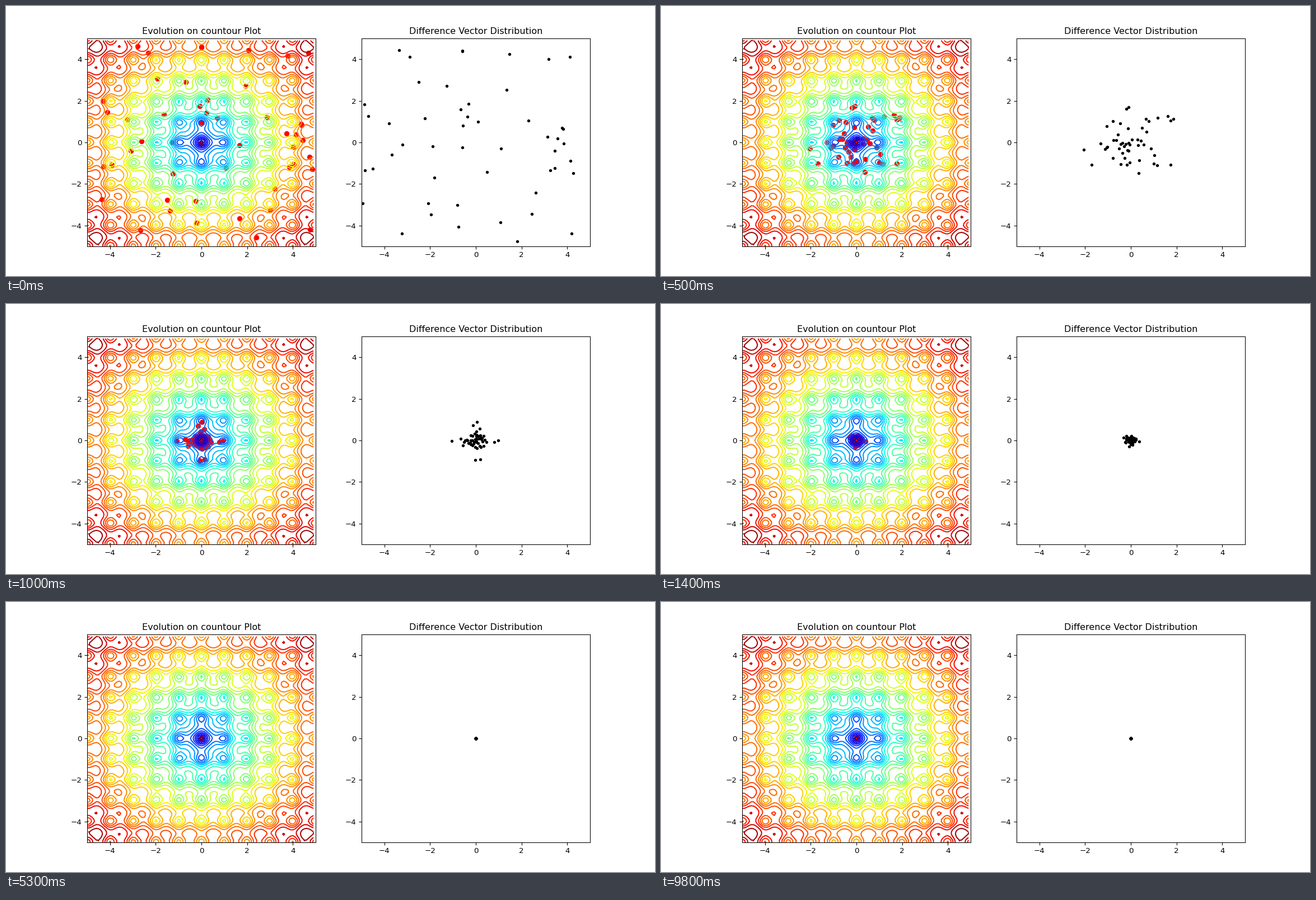
These frames come from a looping animation (1159 px wide and 483 px high, 10000 ms). A matplotlib script:

```python
import numpy as np
import matplotlib.pyplot as plt
from matplotlib.animation import FuncAnimation

FRAMES, INTERVAL = 100, 100
WIDTH, HEIGHT, DPI = 1159, 483, 96
MEMBERS = 50
REACH, DECAY = 4.5, 0.23    # width of the search and its decay per generation


def ackley(x, y):
    bowl = -20 * np.exp(-0.2 * np.sqrt(0.5 * (x**2 + y**2)))
    ripple = -np.exp(0.5 * (np.cos(2 * np.pi * x) + np.cos(2 * np.pi * y)))
    return bowl + ripple + np.e + 20


def evolve(seed=4):
    """Each generation, a member moves to its trial point if that is better."""
    rng = np.random.default_rng(seed)
    points = rng.uniform(-5, 5, (MEMBERS, 2))
    history = [points]
    for n in range(1, FRAMES):
        trials = rng.normal(0, REACH * np.exp(-DECAY * n), points.shape)
        better = ackley(*trials.T) < ackley(*points.T)
        points = np.where(better[:, None], trials, points)
        history.append(points)
    return history


fig, (left, right) = plt.subplots(1, 2, figsize=(WIDTH / DPI, HEIGHT / DPI),
                                  dpi=DPI)
grid = np.arange(-5, 5, 0.1)
X, Y = np.meshgrid(grid, grid)
left.contour(X, Y, ackley(X, Y), levels=np.arange(0, 15, 0.5), cmap="jet")
left.set_title("Evolution on countour Plot")
right.set_title("Difference Vector Distribution")
for ax in (left, right):
    ax.set(xlim=(-5, 5), ylim=(-5, 5))

members = left.scatter([], [], color="red", zorder=1)
differences = right.scatter([], [], color="black", marker=".")
history = evolve()


def update(n):
    points = history[n]
    members.set_offsets(points)
    differences.set_offsets(points - points.mean(axis=0))
    return members, differences


animation = FuncAnimation(fig, update, frames=FRAMES, interval=INTERVAL,
                          repeat=True, repeat_delay=0)
plt.show()
```
